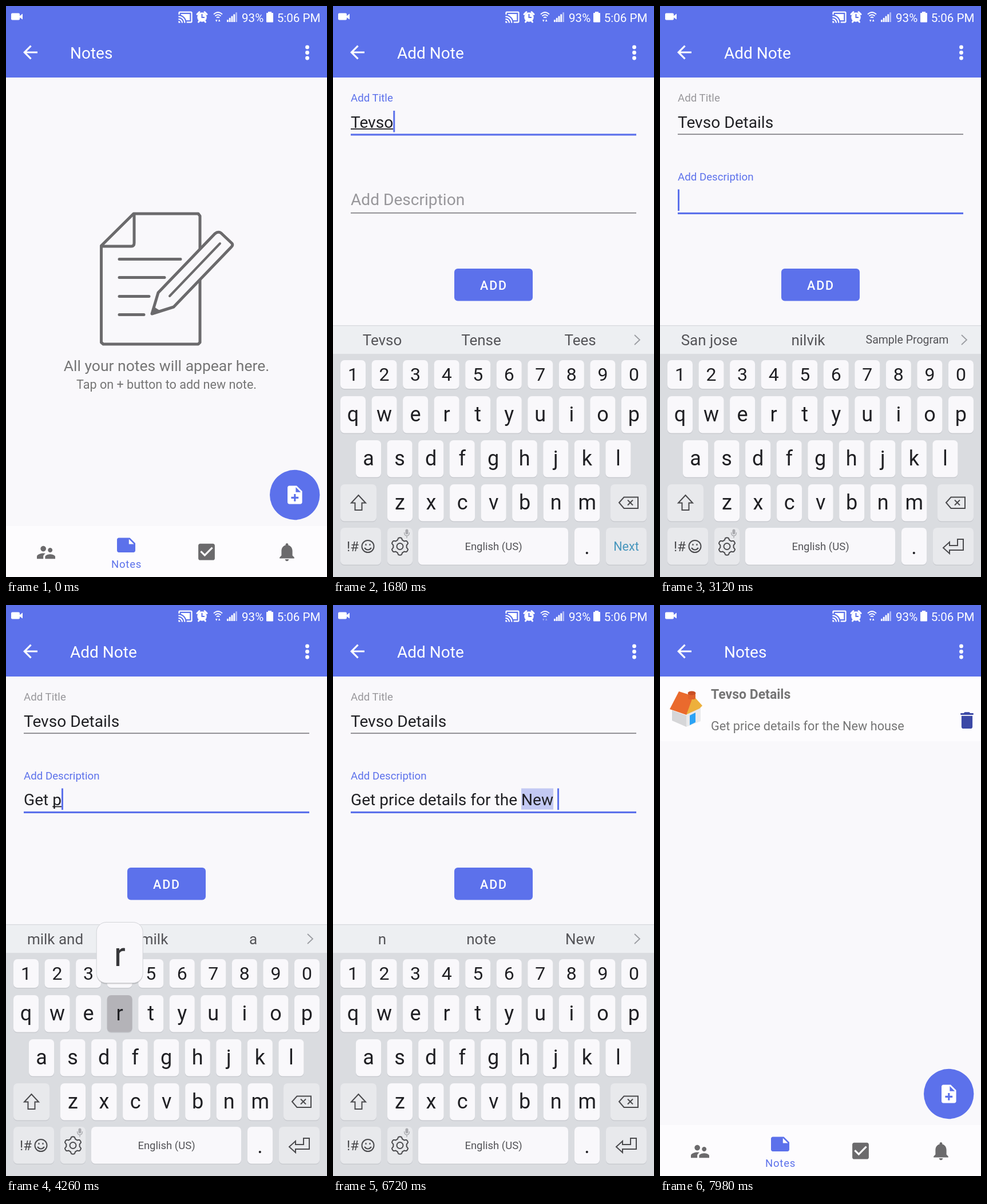
Animation of 561 by 998 pixels, one loop 8 s. Source, as an HTML page:

```html
<!DOCTYPE html>
<html lang="en">
<head>
<meta charset="utf-8">
<title>Notes</title>
<style>
html, body { margin: 0; width: 100%; height: 100%; overflow: hidden; background: #f9f8fb; }
svg { display: block; width: 100%; height: 100%; font-family: Roboto, sans-serif; }
text { white-space: pre; }
.mid { text-anchor: middle; }
.line { fill: none; stroke: #4a4a4d; stroke-width: 2; }
.sketch { fill: none; stroke: #6b6a6c; stroke-width: 5; stroke-linecap: round; stroke-linejoin: round; }
</style>
</head>
<body>
<svg id="stage" viewBox="0 0 561 998"></svg>
<script>
const LOOP = 8000, BLUE = '#5c71eb', PAPER = '#f9f8fb', GREY = '#757575', KEY = '#f9f8fb', SIDE = '#e8e9ec';
const FIELD = 28.1;

const rect = (x, y, w, h, fill, r = 0, more = '') =>
  `<rect x="${x}" y="${y}" width="${w}" height="${h}" rx="${r}" fill="${fill}" ${more}/>`;
const text = (x, y, size, fill, str, more = '') =>
  `<text x="${x}" y="${y}" font-size="${size}" fill="${fill}" ${more}>${str}</text>`;
const icon = (x, y, d, fill, scale = 1.6) =>
  `<path transform="translate(${x} ${y}) scale(${scale})" d="${d}" fill="${fill}"/>`;
const path = (d, more = 'class="line"') => `<path d="${d}" ${more}/>`;
const poly = (points, fill) => `<polygon points="${points}" fill="${fill}"/>`;

const header = title => rect(0, 0, 561, 125, BLUE) +
  icon(23.8, 62.3, 'M20 11H7.83l5.59-5.59L12 4l-8 8 8 8 1.41-1.41L7.83 13H20v-2z', '#fff', 1.56) +
  text(112, 92, 28, '#fff', title) +
  [72, 81.5, 91].map(y => `<circle cx="526.5" cy="${y}" r="3.4" fill="#fff"/>`).join('');

const statusBar = () =>
  rect(9, 12.5, 15, 12, '#fff', 2) + poly('23,18 29,13.5 29,23.5 23,19.5', '#fff') +
  icon(300.3, 6.3, 'M21 3H3c-1.1 0-2 .9-2 2v3h2V5h18v14h-7v2h7c1.1 0 2-.9 2-2V5c0-1.1-.9-2-2-2zM1 18v3h3c0-1.66-1.34-3-3-3zm0-4v2c2.76 0 5 2.24 5 5h2c0-3.87-3.13-7-7-7zm0-4v2c4.97 0 9 4.03 9 9h2c0-6.08-4.93-11-11-11zM19 7H5v1.63c3.96 1.28 7.09 4.41 8.37 8.37H19V7z', '#fff', 1.1) +
  '<circle cx="342.5" cy="19.5" r="8.3" fill="#fff"/>' +
  path('M334 14.5l4-4M351 14.5l-4-4M336.5 28l2-3M348.500 28l-2-3', 'stroke="#fff" stroke-width="3" stroke-linecap="round"') +
  path('M342.500 14V20H347', `fill="none" stroke="${BLUE}" stroke-width="2"`) +
  path('M363 14.500q7.500-7 15 0M365.500 17.500q5-4.500 10 0M368 20.500q2.500-2 5 0', 'fill="none" stroke="#fff" stroke-width="1.8"') +
  '<g id="traffic">' + poly('366,24 369.500,24 367.700,28', '#fff') + poly('371,27 374.500,27 372.700,23', '#fff') + '</g>' +
  [0, 1, 2, 3, 4].map(i => rect(386 + i * 3.8, 24 - i * 3.2, 2.8, 4 + i * 3.2, '#fff', 0, i > 3 ? 'opacity=".5"' : '')).join('') +
  text(412, 27.5, 20.6, '#fff', '93%') +
  rect(455, 12, 12, 16.5, '#fff', 1) + rect(458, 10, 6, 3, '#fff') +
  text(549.5, 27.5, 20.6, '#fff', '5:06 PM', 'text-anchor="end"');

const emptyNotes = () => '<g id="empty">' +
  path('M166.500 419L223 363H336L339 367V588L336 591H170L166.500 588ZM167 420H219Q224 420 224 414V364', 'class="sketch"') +
  path('M198 442.500H305M198 474.500H277M198 507.500H250M198 539.500H241', 'class="sketch"') +
  path('M255 538L266 501 365 398Q371 393 376 397L395 415Q397 418 394 421L293 526Z', `class="sketch" style="fill:${PAPER}"`) +
  path('M286 507L374 415', 'class="sketch" style="stroke-width:4"') +
  poly('255,538 259,526 270,533', '#6b6a6c') +
  text(280.5, 638, 26.5, GREY, 'All your notes will appear here.', 'class="mid"') +
  text(280.5, 669, 21.6, GREY, 'Tap on + button to add new note.', 'class="mid"') + '</g>';

const noteCard = () => '<g id="card">' + rect(0, 125, 561, 113, '#fdfcfe', 3) +
  poly('21,184 46,193 46,213 21,202', '#d6d6d8') +
  poly('46,191 57,170 71,178 71,203 46,213', '#e9e9eb') +
  poly('52,193 62,188 62,205 52,210', '#2ba3f5') +
  poly('56,156 74,176 69,181 45,192', '#edb03c') +
  poly('33,151 58,159 46,192 17,182', '#ea6a2d') +
  rect(49, 154, 13, 11, '#e0622b', 3) + '<ellipse cx="55.500" cy="154" rx="7" ry="3.600" fill="#c94f24"/>' +
  text(89, 164, 23, GREY, 'Tevso Details', 'font-weight="700"') +
  text(89, 219, 21.7, GREY, 'Get price details for the New house') +
  icon(517.3, 182.5, 'M6 19c0 1.100.9 2 2 2h8c1.100 0 2-.9 2-2V7H6v12zM19 4h-3.500l-1-1h-5l-1 1H5v2h14V4z', '#3b48a6') + '</g>';

const notesPage = () => rect(0, 0, 561, 998, PAPER) + header('Notes') + emptyNotes() + noteCard() +
  `<circle cx="504.700" cy="854.500" r="43.700" fill="${BLUE}"/><circle id="ripple" cx="504.700" cy="854.500" fill="#fff"/>` +
  icon(485.6, 835.3, 'M14 2H6c-1.100 0-1.990.9-1.990 2L4 20c0 1.100.89 2 1.990 2H18c1.100 0 2-.9 2-2V8l-6-6zm2 14h-3v3h-2v-3H8v-2h3v-3h2v3h3v2zm-3-7V3.500L18.500 9H13z', '#fff') +
  rect(0, 909, 561, 89, '#fdfcfe') +
  icon(50.8, 935.8, 'M16.500 12c1.380 0 2.490-1.120 2.490-2.500S17.880 7 16.500 7 14 8.120 14 9.500s1.120 2.500 2.500 2.500zM9 11c1.660 0 2.990-1.340 2.990-3S10.660 5 9 5 6 6.340 6 8s1.340 3 3 3zm7.500 3c-1.830 0-5.500.92-5.500 2.750V19h11v-2.250c0-1.830-3.670-2.750-5.500-2.750zM9 13c-2.330 0-7 1.170-7 3.500V19h7v-2.250c0-.85.33-2.340 2.370-3.470C10.500 13.100 9.660 13 9 13z', '#6b6a6c') +
  icon(190.8, 923, 'M22 10l-6-6H4c-1.100 0-2 .9-2 2v12c0 1.100.9 2 2 2h16c1.100 0 2-.9 2-2v-8zm-7-4.500l5.500 5.500H15V5.500z', BLUE) +
  text(184, 982, 18.5, BLUE, 'Notes', 'letter-spacing=".8"') +
  icon(331.3, 935, 'M19 3H5c-1.100 0-2 .9-2 2v14c0 1.100.9 2 2 2h14c1.100 0 2-.9 2-2V5c0-1.100-.9-2-2-2zm-9 14l-5-5 1.410-1.410L10 14.170l7.590-7.590L19 8l-9 9z', '#6b6a6c') +
  icon(471.8, 935, 'M12 22c1.100 0 2-.9 2-2h-4c0 1.100.9 2 2 2zm6-6v-5c0-3.070-1.640-5.640-4.500-6.320V4c0-.83-.67-1.500-1.500-1.500s-1.500.67-1.500 1.500v.68C7.630 5.360 6 7.920 6 11v5l-2 2v1h16v-1l-2-2z', '#6b6a6c');

const input = (i, y) => rect(31, y, 0, 37, '#c3c9f3', 0, `id="mark${i}"`) +
  `<text id="label${i}" x="31"></text>` + text(31, y + 29.5, FIELD, '#202024', '', `id="value${i}"`) +
  rect(31, y + 31, 0, 1.8, '#202024', 0, `id="under${i}"`) + rect(31, y, 3, 37.5, BLUE, 0, `id="caret${i}"`) +
  rect(31, y + 40.3, 499, 1.8, '#858488', 0, `id="rule${i}"`);

const addPage = () => rect(0, 0, 561, 998, PAPER) + header('Add Note') + input(0, 183) + input(1, 320.5) +
  rect(212, 459, 137, 56.5, BLUE, 6) + rect(212, 459, 137, 56.5, '#fff', 6, 'id="flash"') +
  text(281, 496, 21.5, '#fff', 'ADD', 'class="mid" font-weight="500" letter-spacing="1.800"');

function gear() {
  const pts = [];
  for (let a = 0; a < 72; a++) {
    const th = a * Math.PI / 36, r = 13.4 + 1.8 * Math.tanh(2.5 * Math.cos(6 * th));
    pts.push((117 + r * Math.sin(th)).toFixed(1) + ',' + (944.5 - r * Math.cos(th)).toFixed(1));
  }
  return `<polygon points="${pts.join(' ')}" class="line"/><circle cx="117" cy="944.500" r="5.500" class="line"/>`;
}

const PITCH = 54.55, spots = {};
function keyRow(chars, x0, y, h, size, base) {
  return [...chars].map((c, i) => {
    const x = x0 + i * PITCH;
    spots[c] = { x: x + 22, y };
    return rect(x, y + 1.5, 44, h, '#c9cbd0', 7) + rect(x, y, 44, h, KEY, 7, `id="key-${c}"`) +
      text(x + 22, base, size, '#202024', c, `class="mid" id="cap-${c}"`);
  }).join('');
}
const block = (x, y, w, fill, id) => rect(x, y + 1.5, w, 64.5, '#c9cbd0', 7) + rect(x, y, w, 64.5, fill, 7, id ? `id="${id}"` : '');

const keyboard = () => rect(0, 558, 561, 440, '#dadce0') + rect(0, 558, 561, 50, '#edeff2') + rect(0, 558, 561, 1.2, '#d6d8dc') +
  [86, 259, 432].map((x, i) => text(x, 593, 26, '#545458', '', `class="mid" id="sug${i}"`)).join('') +
  path('M527 575L536 583.500 527 592', 'fill="none" stroke="#9b9da2" stroke-width="1.800"') +
  keyRow('1234567890', 13, 619, 50, 32, 655) + keyRow('qwertyuiop', 13, 682, 64.5, 36, 726) +
  keyRow('asdfghjkl', 40, 759, 64.5, 36, 803) + keyRow('zxcvbnm', 95, 836, 64.5, 36, 880) +
  block(13, 836, 63, SIDE, 'shift') + path('M44.500 855L57 868.500H50.500V881H38.500V868.500H32Z', 'class="line" id="arrow"') +
  block(485, 836, 63, SIDE) + path('M500 868L508.500 858.500H533V878H508.500ZM515 863.500l9 9M524 863.500l-9 9') +
  block(13, 912, 71, SIDE) + text(24, 953, 24, '#4a4a4d', '!#') +
  '<circle cx="61" cy="944.500" r="10.500" class="line"/>' + path('M55 947q6 7 12 0M57.500 940v3M64.500 940v3') +
  block(95, 912, 44, SIDE) + gear() + rect(126.5, 914.5, 5, 9, '#a9aaae', 2.5) +
  path('M124.500 920q0 6 4.500 6t4.500-6M129 926v4', 'fill="none" stroke="#a9aaae" stroke-width="1.300"') +
  block(149, 912, 262, KEY, 'space') + text(280.5, 951, 18.5, '#545458', 'English (US)', 'class="mid"') +
  block(422, 912, 44, KEY) + text(444, 958, 36, '#202024', '.', 'class="mid"') +
  block(477, 912, 71, SIDE) + text(512.5, 952, 21.5, '#4796bd', 'Next', 'class="mid" id="next"') +
  path('M530 932H520V943H506V937L495 947 506 957V951H530Z', 'class="line" id="enter"') +
  '<g id="popup">' + rect(-40.5, 2, 81, 106, '#000', 17, 'opacity=".16"') +
  rect(-40.5, 0, 81, 106, KEY, 17, 'stroke="#d3d4d8" stroke-width="1"') +
  text(0, 76.5, 59, '#37373a', '', 'class="mid" id="big"') + '</g>';

stage.innerHTML = `<g>${notesPage()}</g><g id="add">${addPage()}</g><g>${statusBar()}</g><g id="kb">${keyboard()}</g>`;

// [time, key or picked word, suggestions afterwards]; '*' marks a correction
const START = 'San jose|nilvik|Sample Program', SWITCH = 2840, DELAY = 50;
const steps = [
  [960, 'T', 'T|The|Thanks'], [1080, 'e', 'Te|The|Test'], [1220, 'v', 'Tev|Rev|Tee'], [1360, 's', 'Tevs|Tees|Teas'],
  [1500, 'o', 'Tevso|Tense|Tees'], [1760, 'Tevso ', 'and|is|the'],
  [1990, 'D', 'D|Do|Did'], [2080, 'e', 'De|Dear|Dec'], [2180, 't', 'Det|Get|Set'], [2270, 'a', 'Deta|Details|Data'],
  [2360, 'i', 'Detai|Details|Detail'], [2460, 'l', 'Detail|Details|Detailed'], [2580, 's', 'Details|Detail|Detailed'],
  [SWITCH, '', START],
  [3480, 'G', 'G|Good|Get'], [3640, 'e', 'Ge|Get|Gear'], [3780, 't', 'Get|Gets|Getting'], [3960, 'Get ', 'milk and|milk|a'],
  [4100, 'p'], [4230, 'r', 'pr|price|pretty'], [4390, 'i', 'pri|price|prime'], [4560, 'c', 'pric|price|prices'],
  [4700, 'e', 'price|prices|priced'], [4840, 'price ', 'of|range|details'],
  [4970, 'd', 'd|do|details'], [5080, 'e', 'de|details|dear'], [5170, 't', 'det|set|details'], [5260, 'a', 'deta|data|details'],
  [5350, 'i'], [5430, 'l'], [5500, 's', 'deta|*sets|details'], [5720, ' ', 'and|for|of'],
  [5880, 'f', 'f|for|from'], [5980, 'o', 'fo|for|of'], [6070, 'r', 'for|four|form'], [6160, ' ', 'the|a|you'],
  [6230, 't', 't|the|to'], [6300, 'h', 'th|the|that'], [6370, 'e', 'the|them|they'], [6450, ' ', 'first|same|day'],
  [6540, 'n', 'n|note|New'], [6660, 'New '],
  [6850, 'h', 'h|house|home'], [6950, 'o', 'ho|house|how'], [7050, 'u', 'hou|house|hour'], [7150, 's', 'hous|house|hours'],
  [7250, 'e', 'house|houses|home']
];
const caps = [[0, 1020], [1880, 2040], [3300, 3540]];

const $ = id => document.getElementById(id);
const set = (id, attrs) => { for (const k in attrs) $(id).setAttribute(k, attrs[k]); };
const show = (id, on) => set(id, { visibility: on ? 'inherit' : 'hidden' });
const within = (t, a, b) => t >= a && t < b;
const ramp = (t, a, b) => Math.min(1, Math.max(0, (t - a) / (b - a)));
const ease = p => 1 - (1 - p) ** 3;
const pen = document.createElement('canvas').getContext('2d');
const width = str => { pen.font = FIELD + 'px Roboto, sans-serif'; return pen.measureText(str).width; };

function typed(t) {
  const s = { values: ['', ''], sugs: START, changed: 640, press: null };
  for (const [at, key, sugs] of steps) {
    if (key.length === 1 && within(t, at, at + 115)) s.press = { key, at };
    const when = key.length === 1 ? at + DELAY : at;
    if (t < when) break;
    const i = at < SWITCH ? 0 : 1;
    if (key.length > 1) s.values[i] = s.values[i].replace(/\S*$/, key);
    else s.values[i] += key;
    if (sugs) s.sugs = sugs;
    s.changed = when;
  }
  return s;
}

function drawField(i, t, s) {
  const focus = i ? t >= SWITCH : within(t, 540, SWITCH);
  const up = ease(i ? ramp(t, SWITCH, SWITCH + 150) : ramp(t, 540, 690));
  const base = 211 + i * 137, value = s.values[i], word = value.match(/\S*$/)[0];
  const label = $('label' + i);
  label.textContent = i ? 'Add Description' : 'Add Title';
  set('label' + i, { y: base - up * (44 - i), 'font-size': 28.1 - up * 9.4, fill: focus ? BLUE : '#98979b' });
  $('value' + i).textContent = value;
  const end = width(value), start = end - width(word);
  set('under' + i, { x: 31 + start, width: focus ? width(word) : 0 });
  const marked = value.endsWith('New ');
  set('mark' + i, { x: 31 + (marked ? width(value.slice(0, -4)) : 0), width: marked ? width('New') : 0 });
  set('caret' + i, { x: 31 + end });
  show('caret' + i, focus && (t - s.changed) % 1000 < 500);
  set('rule' + i, { fill: focus ? BLUE : '#858488', height: focus ? 3.2 : 1.8 });
}

function draw(t) {
  const s = typed(t), upper = caps.some(([a, b]) => within(t, a, b));

  const open = ease(ramp(t, 230, 430)) * (1 - ramp(t, 7640, 7840));
  set('add', { opacity: open, transform: `translate(0 ${(1 - open) * 60})` });
  show('add', open > 0);
  show('empty', t < 4000);
  show('card', t >= 4000);
  const tap = ramp(t, 60, 260);
  set('ripple', { r: 43.7 * ease(tap), opacity: tap < 1 ? 0.28 * (1 - tap * 0.5) : 0 });
  set('flash', { opacity: within(t, 7460, 7700) ? 0.25 * Math.sin(Math.PI * ramp(t, 7460, 7700)) : 0 });
  set('traffic', { opacity: within(t % 2000, 600, 1000) ? 0.4 : 1 });

  drawField(0, t, s);
  drawField(1, t, s);

  const rise = ease(ramp(t, 540, 780)) * (1 - ramp(t, 7620, 7800) ** 2);
  set('kb', { transform: `translate(0 ${440 * (1 - rise)})` });
  show('kb', rise > 0);
  s.sugs.split('|').forEach((word, i) => {
    const str = word.replace('*', ''), small = str.length > 10;
    $('sug' + i).textContent = str;
    set('sug' + i, { 'font-size': small ? 19.5 : 26, y: small ? 590 : 593, fill: word[0] === '*' ? '#55b0df' : '#545458' });
  });

  const hit = s.press && t < s.press.at + DELAY ? s.press.key.toLowerCase() : '';
  for (const c in spots) {
    $('cap-' + c).textContent = upper ? c.toUpperCase() : c;
    set('key-' + c, { fill: c === hit ? '#b4b3b8' : KEY });
  }
  set('space', { fill: hit === ' ' ? '#b4b3b8' : KEY });
  set('shift', { fill: within(t, 1840, 1910) ? '#b4b3b8' : SIDE });
  $('arrow').style.fill = upper ? '#4796bd' : 'none';
  $('arrow').style.stroke = upper ? '#4796bd' : '';
  show('next', t < SWITCH);
  show('enter', t >= SWITCH);

  const spot = s.press && spots[s.press.key.toLowerCase()];
  show('popup', !!spot);
  if (spot) {
    set('popup', { transform: `translate(${spot.x} ${spot.y - 127.5})` });
    $('big').textContent = s.press.key;
  }
}

const begin = performance.now();
function tick() {
  draw((performance.now() - begin) % LOOP);
  requestAnimationFrame(tick);
}
tick();
</script>
</body>
</html>
```
